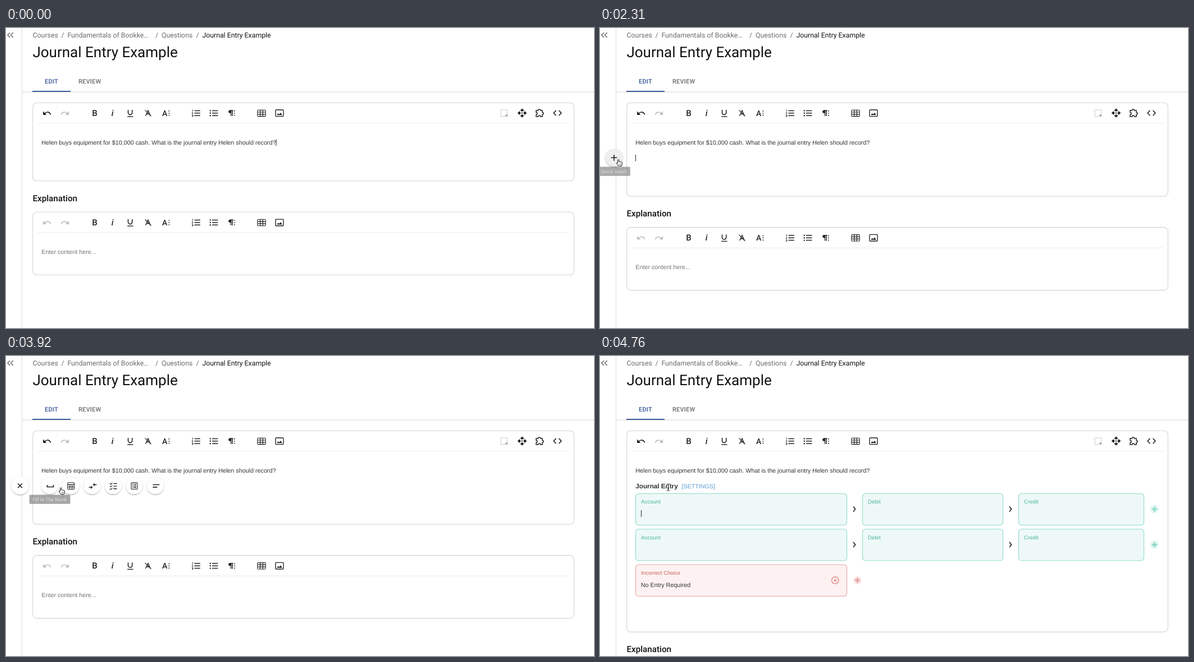
Animation, 1047 px wide and 535 px high, one loop 4.97 s. Source, as an HTML page with a canvas:

```html
<!DOCTYPE html>
<html lang="en">
<head>
<meta charset="utf-8">
<title>Journal Entry Example</title>
<style>
html, body { margin: 0; width: 100%; height: 100%; overflow: hidden; background: #fff; }
canvas { display: block; }
</style>
</head>
<body>
<canvas id="stage" width="1047" height="535"></canvas>
<script>
const ctx = document.getElementById('stage').getContext('2d');
const LOOP = 4970, STEP = 70;
const UI = 'Roboto, sans-serif';
const DOC = '"Liberation Sans", Arial, sans-serif';
const INK = '#222', MUTED = '#6b6b6b', OFF = '#bdbdbd', BLUE = '#3b5998';
const GREEN = { line: '#8fdbcc', fill: '#eef9f7', text: '#4bb39e', glow: '#e3f6f2' };
const RED = { line: '#e4a3a3', fill: '#fdf2f1', text: '#c95f63', glow: '#fbe9e8' };

const clamp = v => Math.max(0, Math.min(1, v));
const ramp = (t, from, to) => clamp((t - from) / (to - from));

// CSS "ease" curve, solved by bisection
function ease(x) {
  if (x <= 0 || x >= 1) return clamp(x);
  const bez = (a, b, s) => 3 * a * s * (1 - s) ** 2 + 3 * b * s * s * (1 - s) + s ** 3;
  let lo = 0, hi = 1;
  for (let i = 0; i < 24; i++) {
    const mid = (lo + hi) / 2;
    if (bez(0.25, 0.25, mid) < x) lo = mid; else hi = mid;
  }
  return bez(0.1, 1, lo);
}

function text(str, x, y, font, color, spacing = 0) {
  ctx.font = font;
  ctx.letterSpacing = spacing + 'px';
  ctx.fillStyle = color;
  ctx.fillText(str, x, y);
}

function stroke(path, color = INK, width = 1.5) {
  ctx.strokeStyle = color;
  ctx.lineWidth = width;
  ctx.stroke(new Path2D(path));
}

function fill(path, color = INK) {
  ctx.fillStyle = color;
  ctx.fill(new Path2D(path));
}

function at(x, y, draw, scale = 1) {
  ctx.save();
  ctx.translate(x, y);
  ctx.scale(scale, scale);
  draw();
  ctx.restore();
}

function rect(x, y, w, h, color) {
  ctx.fillStyle = color;
  ctx.fillRect(x, y, w, h);
}

function roundBox(x, y, w, h, r, line, back) {
  ctx.beginPath();
  ctx.roundRect(x, y, w, h, r);
  if (back) { ctx.fillStyle = back; ctx.fill(); }
  if (line) { ctx.strokeStyle = line; ctx.lineWidth = 1.1; ctx.stroke(); }
}

function disc(x, y, r, color) {
  ctx.beginPath();
  ctx.arc(x, y, r, 0, 7);
  ctx.fillStyle = color;
  ctx.fill();
}

function arrowBack(color) {
  fill('M-7-3v6.3h6.3z', color);
  stroke('M-4.3 1C-.5-3 5-2.2 6.6 3', color, 1.6);
}

const dots = x => [-3.6, 0.3, 4.2].forEach(y => disc(x, y, 0.95, INK));

const tools = {
  73: color => arrowBack(color),
  105: () => { ctx.scale(-1, 1); arrowBack(OFF); },
  158: () => text('B', -4.7, 5.3, '500 15px ' + UI, INK),
  190: () => text('i', -2.3, 5.3, 'italic 500 15px ' + UI, INK),
  221: () => {
    stroke('M-3.5-5.6v5a3.6 3.6 0 0 0 7.2 0v-5', INK, 1.6);
    stroke('M-4.9 6.4h10.4', INK, 1.4);
  },
  253: () => {
    stroke('M-4.4 5L0-4.4 4.2 5M-2.8 1.8h4', INK, 1.4);
    stroke('M-5.4-5.2L5.4 5.8', INK, 1.2);
  },
  285: () => { text('A', -7, 5.2, '500 14px ' + UI, INK); dots(5.4); },
  338: () => {
    stroke('M-2.5-4.2H7.8M-2.5.2H7.8M-2.5 4.6H7.8', INK, 1.5);
    stroke('M-6.8-5.6h1.2v3M-7-1h2l-2 2.6h2.2M-7 3.6h2v2.8h-2M-7 5h2', INK, 0.8);
  },
  370: () => {
    stroke('M-3-4.2H7.4M-3 .2H7.4M-3 4.6H7.4', INK, 1.5);
    [-4.2, 0.2, 4.6].forEach(y => disc(-6.2, y, 1.2, INK));
  },
  402: () => {
    fill('M-.8-5v5.2h-2.4a2.6 2.6 0 0 1 0-5.2z');
    stroke('M-3-4.4H2.6M-1.4-5V5.4M1.2-5V5.4', INK, 1.4);
    dots(5);
  },
  455: () => {
    roundBox(-7.2, -5.4, 14.4, 11.4, 1.2, INK);
    stroke('M-7-1.6H7M-7 2.2H7M-2.4-5.4V6M2.4-5.4V6', INK, 1.2);
  },
  487: () => {
    stroke('M-6-5.6H6a1 1 0 0 1 1 1V5a1 1 0 0 1-1 1H-6a1 1 0 0 1-1-1V-4.6a1 1 0 0 1 1-1z', INK, 1.4);
    fill('M-4.8 3.7l2.5-3.2 1.8 2 2.4-3.2 3.1 4.4z');
  }
};

const extras = {
  887: () => {
    ctx.setLineDash([1.6, 1.5]);
    stroke('M-6-5.6H6V6H-6z', '#aaa', 1.2);
    ctx.setLineDash([]);
    rect(2, 2, 5, 5, '#fff');
    stroke('M2.2 4.4h4.6M4.5 2v5', '#999', 1.3);
  },
  919: () => {
    for (let i = 0; i < 4; i++) {
      fill('M0-8.2l3.9 4h-2.3v1.4h-3.2v-1.4h-2.3z');
      ctx.rotate(Math.PI / 2);
    }
    disc(0, 0, 1.2, INK);
  },
  950: () => stroke('M-6-4.5h3.5a2 2 0 0 1 4 0h3.5v3.5a2 2 0 0 1 0 4v3.5h-3.3a2 2 0 0 0-4 0h-3.7v-3.5a2 2 0 0 0 0-4z', INK, 1.5),
  982: () => stroke('M-2.6-4.6L-6.8 0l4.2 4.6M2.6-4.6L6.8 0 2.6 4.6', INK, 1.6)
};

function editor(top, height, undoColor, full) {
  roundBox(47.7, top, 963.6, height, 7, '#d3d5d8');
  rect(56, top + 36, 947, 1, '#ececec');
  const row = full ? { ...tools, ...extras } : tools;
  for (const x in row) at(+x, top + 18.4, () => row[x](undoColor));
}

function header() {
  rect(28, 0, 1, 535, '#dcdcdc');
  stroke('M7 8.3L2.9 12.6 7 16.9M12.7 8.3L8.6 12.6l4.1 4.3', '#666', 1.4);
  const crumb = '12.3px ' + UI;
  const crumbs = [['Courses', 47.6], ['/', 98.6], ['Fundamentals of Bookke…', 109.4],
    ['/', 266], ['Questions', 277], ['/', 338.5]];
  crumbs.forEach(([str, x]) => text(str, x, 17, crumb, MUTED));
  text('Journal Entry Example', 349.4, 17, crumb, '#111');
  text('Journal Entry Example', 47.4, 52.3, '26px ' + UI, '#111');
  text('EDIT', 69, 99, '500 11px ' + UI, BLUE, 0.2);
  text('REVIEW', 129, 99, '500 11px ' + UI, MUTED, 0.2);
  rect(29, 113.5, 1018, 1, '#d8d8d8');
  rect(47, 112, 68, 2, BLUE);
}

function field(x, y, w, label, tone) {
  roundBox(x, y, w, 56, 5, tone.line, tone.fill);
  text(label, x + 9.6, y + 17.7, '9.65px ' + DOC, tone.text);
}

function addMark(x, y, tone) {
  disc(x, y, 7.5, tone.glow);
  stroke(`M${x - 4.5} ${y}h9M${x} ${y - 4.5}v9`, tone.line, 2.8);
}

function journalForm(caretOn) {
  text('Journal Entry', 63.3, 236, 'bold 11.7px ' + DOC, '#333');
  text('[SETTINGS]', 145.3, 236, '10.75px ' + DOC, '#5f9fd8');
  for (const y of [245.5, 308.8]) {
    field(63.5, y, 376, 'Account', GREEN);
    field(467.5, y, 250, 'Debit', GREEN);
    field(745.5, y, 223, 'Credit', GREEN);
    for (const x of [453, 731]) stroke(`M${x - 2} ${y + 23}l3.6 4.6-3.6 4.6`, '#333', 1.8);
    addMark(987.3, y + 27.7, GREEN);
  }
  field(63.5, 372.3, 376, 'Incorrect Choice', RED);
  text('No Entry Required', 72.8, 411.6, '10.75px ' + DOC, '#333');
  at(418.8, 400, () => stroke('M6.2 0a6.2 6.2 0 1 1-12.4 0a6.2 6.2 0 1 1 12.4 0M-2.2-2.2l4.4 4.4M2.2-2.2l-4.4 4.4', '#dd8f8f', 1.5));
  addMark(458.3, 400, RED);
  if (caretOn) rect(73, 275, 1, 12, '#222');
}

// layered elevation: inset, offset, blur, opacity
const shadows = [[1.8, 2.6, 1, 0.2], [0, 1.8, 1.8, 0.14], [0, 0.9, 4.4, 0.12]];

function button(x, y, r, scale, color, draw) {
  if (scale <= 0) return;
  at(x, y, () => {
    ctx.save();
    for (const [inset, drop, blur, alpha] of shadows) {
      ctx.shadowColor = `rgba(0,0,0,${alpha})`;
      ctx.shadowOffsetY = drop;
      ctx.shadowBlur = blur;
      disc(0, 0, r - inset, color);
    }
    ctx.restore();
    disc(0, 0, r, color);
    draw();
  }, scale);
}

const inserts = [
  () => stroke('M-4.6-1.6v3.6H6.4v-3.6', INK, 1.7),
  () => {
    roundBox(-5.7, -5.8, 11.6, 12, 1, INK);
    stroke('M-5.7-2.2H5.9M-5.7 2H5.9M-1.8-2.2V6M2-2.2V6', INK, 1.2);
  },
  () => {
    stroke('M-5.6 2.8h4M8.2-2h-4', INK, 1.6);
    fill('M-2-.2v6L1.2 2.8zM4.6-5v6L1.4-2z');
  },
  () => {
    stroke('M.6-4h6M.6.6h6M.6 5.2h6', INK, 1.4);
    stroke('M-6-4l1.6 1.5 3-3M-6 .6l1.6 1.5 3-3M-6 5.2l1.6 1.5 3-3', INK, 1.1);
  },
  () => {
    roundBox(-5.4, -5.4, 11, 11.4, 1, INK);
    stroke('M-3.4-2.4h1.4M-3.4.3h1.4M-3.4 3h1.4M-1-2.4h4.6M-1 .3h4.6M-1 3h4.6', INK, 1.3);
  },
  () => stroke('M-4.6-2H7.4M-4.6 2.4H3.4', INK, 1.7)
];

function quickInsert(t) {
  const hover = t >= 2240 && t < 3290;
  const grow = t < 140 ? 0.6 : 1;
  button(25, 231.3, 15.5, grow, hover ? '#eee' : '#fff', () => {
    ctx.rotate(ease(ramp(t, 2660, 2860)) * Math.PI * 0.75);
    stroke('M-5.4 0h10.8M0-5.4v10.8', INK, 1.6);
  });
  inserts.forEach((draw, i) => {
    const start = 2700 + i * 30;
    button(78 + i * 37.6, 231.5, 14.8, ease(ramp(t, start, start + 200)), '#fff', draw);
  });
}

function tooltip(str, mid, alpha) {
  if (alpha <= 0) return;
  ctx.save();
  ctx.globalAlpha = alpha;
  ctx.font = '8.8px ' + UI;
  ctx.letterSpacing = '0px';
  const w = ctx.measureText(str).width;
  roundBox(mid - w / 2 - 5.7, 247.5, w + 11.4, 16.3, 1.5, null, '#6f6f6f');
  text(str, mid - w / 2, 258.8, '8.8px ' + UI, '#fff');
  ctx.restore();
}

// time, x, y of the pointer's hot spot
const track = [
  [700, 484, 205.5], [910, 440, 215], [1120, 374, 225.5], [1400, 205, 234], [1680, 79, 238],
  [1820, 71, 238], [2030, 52, 237], [2240, 33, 235], [3150, 33, 235], [3430, 70, 235.5],
  [3710, 71, 235.5], [3780, 90, 236], [3850, 90, 236], [4130, 121.5, 234], [LOOP, 121.5, 234]
];

function pointerAt(t) {
  const i = track.findIndex(p => p[0] > t);
  const [t0, x0, y0] = track[i - 1], [t1, x1, y1] = track[i];
  const k = ramp(t, t0, t1);
  return [x0 + (x1 - x0) * k, y0 + (y1 - y0) * k];
}

function pointer(t) {
  if (t < track[0][0]) return;
  const [x, y] = pointerAt(t);
  const clicking = (t >= 2520 && t < 2660) || (t >= 4340 && t < 4620);
  if (clicking) {
    ctx.beginPath();
    ctx.arc(x + 0.6, y - 0.6, 21.8, 0, 7);
    ctx.strokeStyle = '#111';
    ctx.lineWidth = 2.2;
    ctx.stroke();
  }
  if (t >= 2240 && t < 4690) {
    at(x, y, () => {
      const hand = 'M-1.4 5.6V.6a1.1 1.1 0 0 1 2.2 0v3q1-1 2 .2 1-.8 1.8.3 1.5-.5 1.7 1v2.6q0 2-1 3.6H.2Q-1.4 9-3.6 6.5q-.2-1.6 1.2-1.2z';
      fill(hand, '#fff');
      stroke(hand, '#111', 1);
      stroke('M1.2 7v2.4M2.8 7v2.4M4.2 7v2.4', '#333', 0.6);
    });
  } else {
    at(x, y, () => {
      const beam = 'M-2.8-6Q-.4-6 0-4.6Q.4-6 2.8-6M0-4.6V4.6M-2.8 6Q-.4 6 0 4.6Q.4 6 2.8 6M-1.4 1.6h2.8';
      stroke(beam, '#fff', 2.8);
      stroke(beam, '#111', 1.1);
    });
  }
}

function draw(t) {
  rect(0, 0, 1047, 535, '#fff');
  const filled = t >= 4690;
  const shift = filled ? 219.3 : t >= 70 ? 27.3 : 0;
  header();
  editor(133.2, 139.6 + shift, INK, true);
  text('Explanation', 47.4, 309 + shift, '500 15.2px ' + UI, '#111');
  editor(328.3 + shift, 112, OFF, false);
  text('Enter content here...', 63.3, 403 + shift, '10.75px ' + DOC, '#757575');
  text('Helen buys equipment for $10,000 cash. What is the journal entry Helen should record?',
    63.3, 208, '10.75px ' + DOC, '#333');

  if (t < 70) rect(480.5, 198.5, 1, 11.5, '#222');
  if (filled) {
    journalForm(t >= 4760);
  } else if (t >= 70) {
    const caretOn = t >= 100 && Math.floor((t - 100) / 525) % 2 === 0;
    if (caretOn) rect(63, 226, 1, t >= 2730 ? 2 : 11.5, '#222');
    if (t < 4620) quickInsert(t);
  }

  tooltip('Quick Insert', 24.7, t < 2520 ? ramp(t, 2210, 2380) : ramp(t, 2770, 2970) * (1 - ramp(t, 3220, 3360)));
  tooltip('Fill In The Blank', 78, ramp(t, 3400, 3600) * (1 - ramp(t, 3870, 4000)));
  tooltip('Journal Entry', 116, ramp(t, 4000, 4130) * (1 - ramp(t, 4270, 4410)));
  pointer(t);
}

ctx.textRendering = 'geometricPrecision';
const begin = performance.now();

function tick() {
  const t = (performance.now() - begin) % LOOP;
  draw(Math.floor(t / STEP) * STEP);
  requestAnimationFrame(tick);
}
tick();
</script>
</body>
</html>
```
